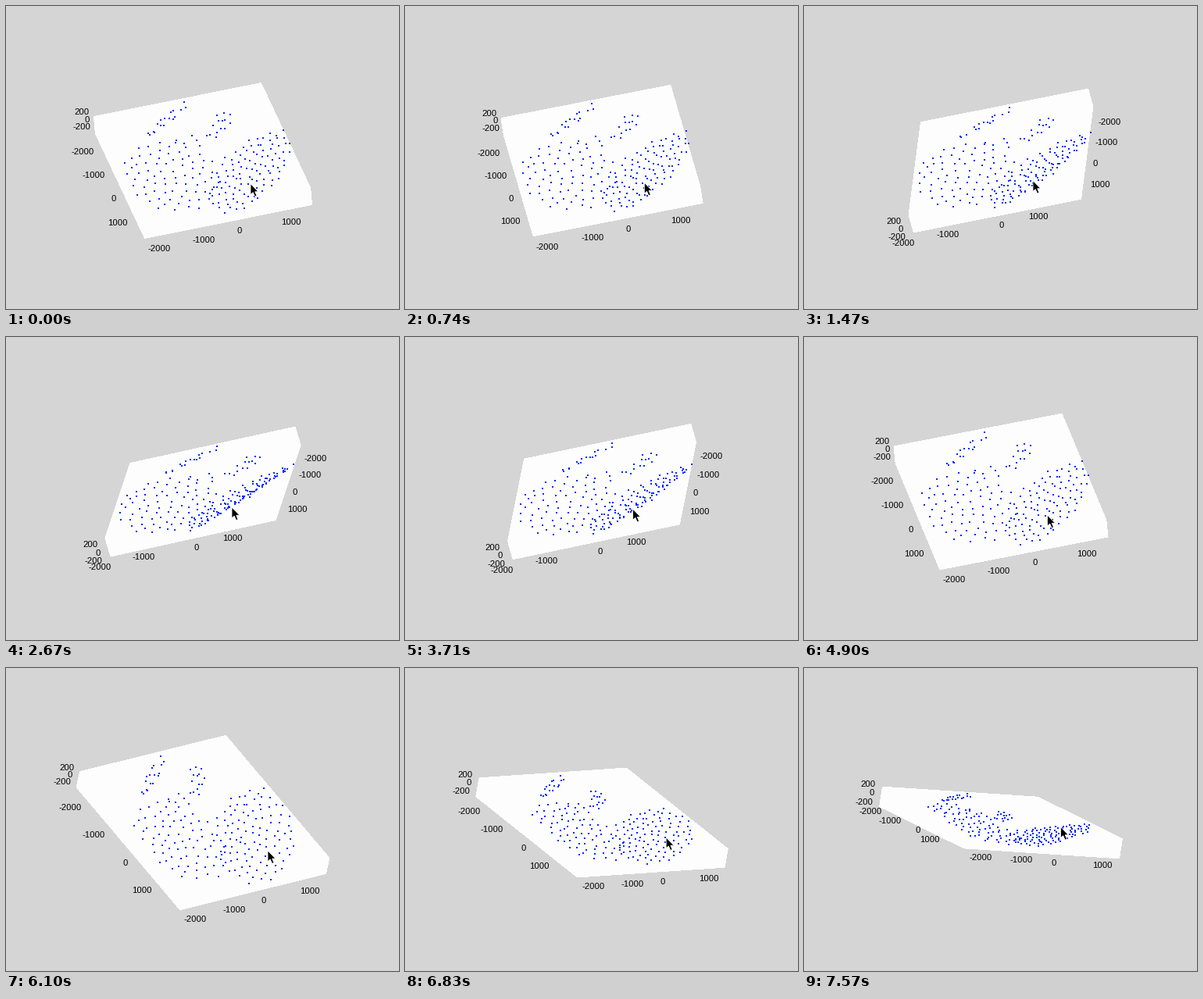
Write a matplotlib script that moves like this. It is 503 by 388 pixels and loops after 8 s.

```python
import numpy as np
import matplotlib.pyplot as plt
from matplotlib.animation import FuncAnimation
from matplotlib.collections import PolyCollection
from matplotlib.patches import Polygon

W, H, DPI = 503, 388, 100
PX = 72 / DPI                      # one pixel in points
LOOP, INTERVAL, STEPS = 8000, 50, 54
SCALE = 58.75                      # pixels per 1000 data units
STAGE = np.array([252, 198])
TIP = np.array([313, 227.5])       # pointer at the start of the drag

# Axis limits and ticks, in thousands
LOW = np.array([-2.035, -2.5, -0.225])
HIGH = np.array([1.73, 1.93, 0.215])
MID = (LOW + HIGH) / 2
TICKS = [(-2, -1, 0, 1), (-2, -1, 0, 1), (-0.2, 0, 0.2)]

# Turning points of the drag: step, pixels right, pixels down
DRAG = np.array([(1, 0, 0), (10, -20, -4), (18, -24, -9.5), (24, -23.5, -9),
                 (28, -15, -2), (33, -1.5, 0.5), (39, 25, 9), (41, 22, 6.3),
                 (47, 21, -14), (51, 15.5, -24)])

# Groups of dots in the opening view: centre, half axes, tilt, count
SWARMS = [((313, 212), (68, 34), 44, 105), ((212, 217), (64, 45), -15, 75),
          ((205, 147), (38, 6), 42, 17), ((276, 150), (22, 11), 60, 13),
          ((238, 172), (22, 9), 0, 6)]


def opening_view():
    """Camera axes (right, down, depth) from the screen vectors of x and y."""
    x, y = np.array([56.5, -11.4]) / SCALE, np.array([14.2, 30.3]) / SCALE
    z1 = -np.sqrt(1 - x[1] ** 2 - y[1] ** 2)
    right = np.array([x[0], y[0], -(x[0] * x[1] + y[0] * y[1]) / z1])
    right /= np.linalg.norm(right)
    down = np.array([x[1], y[1], z1])
    return right, down, np.cross(right, down)


def rotate(a, b, degrees):
    c, s = np.cos(np.radians(degrees)), np.sin(np.radians(degrees))
    return c * a + s * b, c * b - s * a


def drag_views():
    """Orbit the camera by one degree for each pixel of the drag."""
    steps = np.arange(STEPS)
    path = np.c_[np.interp(steps, DRAG[:, 0], DRAG[:, 1]),
                 np.interp(steps, DRAG[:, 0], DRAG[:, 2])]
    right, down, depth = opening_view()
    views = []
    for yaw, pitch in np.diff(path, axis=0, prepend=path[:1]):
        down, depth = rotate(down, depth, pitch)
        right, depth = rotate(right, depth, yaw)
        views.append(SCALE * np.array([right, down]))
    return views, path + TIP


def project(points, m):
    return (np.asarray(points) - MID) @ m.T + STAGE


def swarm(rng, centre, axes, tilt, count):
    """Sunflower spread in a tilted ellipse, slightly shaken."""
    i = np.arange(count)
    r, t = np.sqrt((i + 0.5) / count), i * np.pi * (3 - np.sqrt(5))
    u, v = axes[0] * r * np.cos(t), axes[1] * r * np.sin(t)
    c, s = np.cos(np.radians(tilt)), np.sin(np.radians(tilt))
    return np.c_[c * u + s * v, c * v - s * u] + centre + rng.normal(0, 1, (count, 2))


def make_cloud(m):
    """Drop the swarms onto a parabolic trough."""
    rng = np.random.default_rng(4)
    spots = np.vstack([swarm(rng, *group) for group in SWARMS]) - STAGE
    z = np.zeros(len(spots))
    for _ in range(25):
        flat = (spots - np.outer(z - MID[2], m[:, 2])).T
        x, y = np.linalg.solve(m[:, :2], flat) + MID[:2, None]
        z = np.minimum(0.19 * (0.82 * x + 0.57 * y - 0.13) ** 2 - 0.19, 0.215)
    return np.c_[x, y, z]


def rectangle(axis, value):
    """Corners of the box face where the given axis has this value."""
    u, v = [i for i in range(3) if i != axis]
    corners = np.empty((4, 3))
    corners[:, axis] = value
    corners[:, u] = np.array([LOW[u], HIGH[u], HIGH[u], LOW[u]])
    corners[:, v] = np.array([LOW[v], LOW[v], HIGH[v], HIGH[v]])
    return corners


def span(axis, corner):
    """Box-long line along one axis through the corner."""
    ends = np.array([corner, corner], float)
    ends[:, axis] = LOW[axis], HIGH[axis]
    return ends


def face_grid(axis, value):
    u, v = [i for i in range(3) if i != axis]
    for fixed, free in ((u, v), (v, u)):
        for tick in TICKS[fixed]:
            corner = np.zeros(3)
            corner[axis], corner[fixed] = value, tick
            yield span(free, corner)


def trace(ends, gap=1):
    """Pixel centres along a line, one for every gap pixels."""
    start, end = ends
    count = int(max(abs(end - start)) / gap) + 1
    return np.floor(np.linspace(start, end, count)) + 0.5


def squares(size, color, z):
    return ax.scatter([], [], s=(size * PX) ** 2, marker="s", c=color,
                      linewidths=0, antialiased=False, zorder=z)


fig = plt.figure(figsize=(W / DPI, H / DPI), dpi=DPI, facecolor="#d5d5d5")
ax = fig.add_axes([0, 0, 1, 1])
ax.set_xlim(0, W)
ax.set_ylim(H, 0)
ax.axis("off")

walls = PolyCollection([], facecolors="#fdfdfd", edgecolors="none",
                       antialiaseds=False, zorder=1)
ax.add_collection(walls, autolim=False)
ink = squares(0.9, "black", 2)
dots = squares(2.9, "#0028ff", 4)
ARROW = np.array([(0, 0), (0, 14), (3.2, 11.2), (5.6, 16.6), (8, 15.6),
                  (5.7, 10.3), (10, 10.3)])
pointer = ax.add_patch(Polygon(ARROW, closed=True, fc="black", ec="white",
                               lw=0.8 * PX, zorder=6))
labels = [[ax.text(0, 0, f"{1000 * t:.0f}", fontsize=11.2 * PX, va="center",
                   family="Liberation Sans", zorder=5) for t in ticks]
          for ticks in TICKS]
views, tips = drag_views()
cloud = make_cloud(views[0])


def draw(i):
    step = int(i * INTERVAL * STEPS / LOOP + 0.25)
    m = views[step]
    ex, ey = m[:, 0], m[:, 1]
    turned = np.cross(m[0], m[1])[0] > 0     # side wall on the left

    faces = [(2, LOW[2]), (1, LOW[1]), (0, LOW[0] if turned else HIGH[0])]
    walls.set_verts([project(rectangle(*f), m) for f in faces])
    pixels = [trace(project(line, m), 3) for f in faces for line in face_grid(*f)]

    to_x, to_y = ex / np.linalg.norm(ex), ey / np.linalg.norm(ey)
    y_drop = 7.5 if ex[1] / ex[0] < -0.06 else 0.5
    near_x = HIGH[0] if turned else LOW[0]
    z_corner = (LOW[0], HIGH[1] if turned else LOW[1], 0)
    # corner, tick direction, label offset, label alignment
    layout = [
        ((0, HIGH[1], LOW[2]), to_y, (0, 9.5), "left" if ey[0] > 0 else "right"),
        ((near_x, 0, LOW[2]), to_x if turned else -to_x,
         (3 if turned else -4, y_drop), "left" if turned else "right"),
        (z_corner, -to_x if turned else -to_y,
         (-5, 6.5) if turned else (-4, -2), "right"),
    ]
    for axis, (corner, out, shift, align) in enumerate(layout):
        pixels.append(trace(project(span(axis, corner), m)))
        for tick, label in zip(TICKS[axis], labels[axis]):
            spot = np.array(corner, float)
            spot[axis] = tick
            start = project(spot, m)
            end = start + 5 * out
            pixels.append(trace((start, end)))
            label.set_position(end + shift)
            label.set_ha(align)
    ink.set_offsets(np.vstack(pixels))
    dots.set_offsets(np.floor(project(cloud, m)) + 0.5)
    pointer.set_xy(ARROW + tips[step])
    return [walls, ink, dots, pointer]


anim = FuncAnimation(fig, draw, frames=LOOP // INTERVAL, interval=INTERVAL,
                     repeat=True, repeat_delay=0, blit=False)
plt.show()
```
